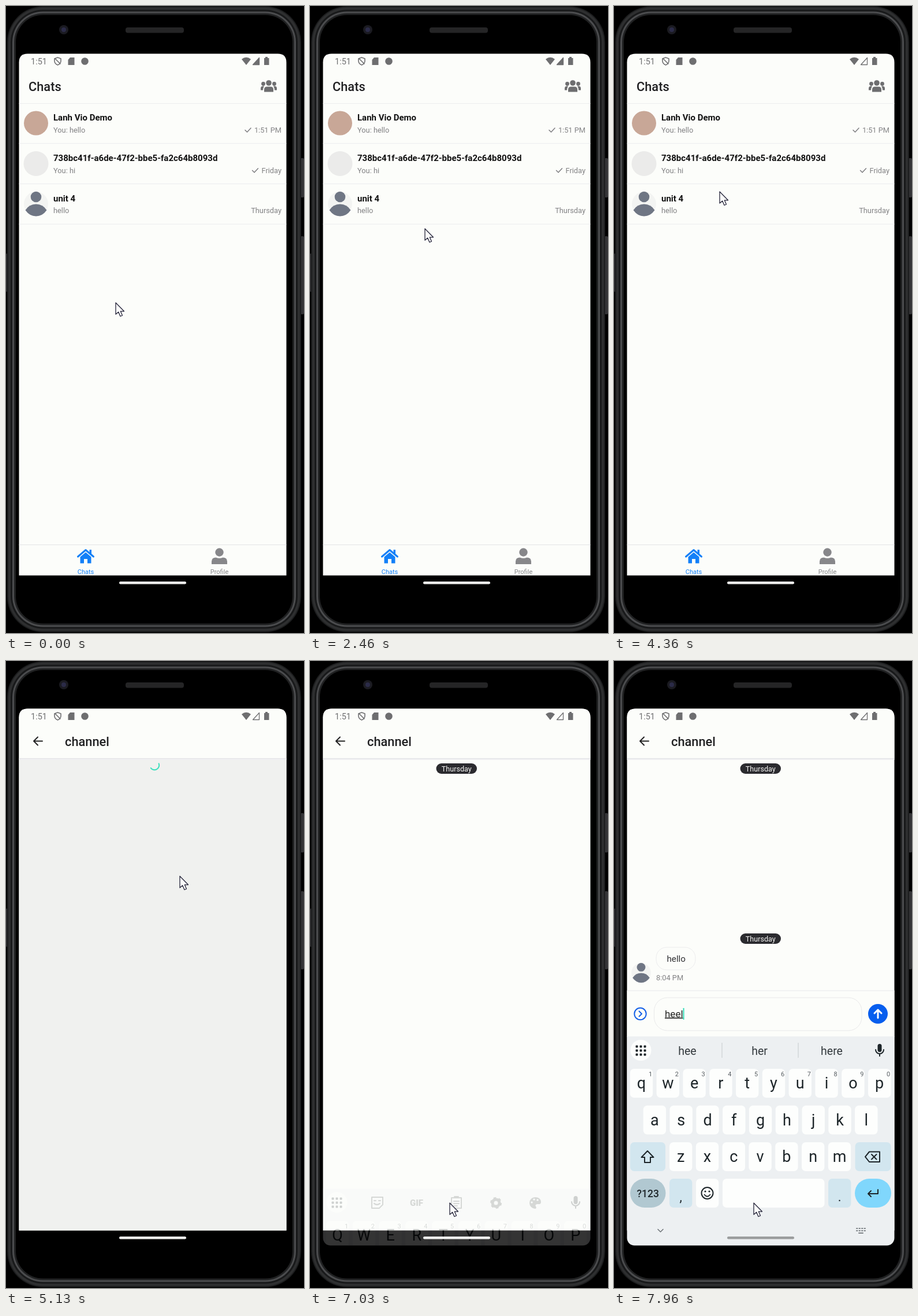
These frames come from a looping animation (516x1084 px, 8000 ms). An HTML page:

```html
<!DOCTYPE html>
<html lang="en">
<head>
<meta charset="utf-8">
<title>Chat app</title>
<style>
  html, body { margin: 0; width: 100%; height: 100%; overflow: hidden; background: #000; }
  svg { display: block; width: 100vw; height: 100vh; font-family: Roboto, Arial, sans-serif; }
  .mid { text-anchor: middle; }
  .end { text-anchor: end; }
  .title { font-size: 21.8px; font-weight: 500; fill: #202022; }
  .name { font-size: 15px; font-weight: 700; fill: #111; }
  .sub { font-size: 12.8px; fill: #828284; }
  .line { fill: none; stroke-linecap: round; stroke-linejoin: round; }
</style>
</head>
<body>
<svg id="stage" viewBox="0 0 516 1084"></svg>
<script>
const LOOP = 8000, PAPER = '#fcfdfa', GREY = '#6e6e70', LIFT = 335;
const OPEN = 4600, LOADED = 5450, RESIZE = 6985, RELAID = 7150, TYPED = [7420, 7560, 7740, 7930];

const rect = (x, y, w, h, fill, rx = 0, more = '') =>
  `<rect x="${x}" y="${y}" width="${w}" height="${h}" rx="${rx}" fill="${fill}" ${more}/>`;
const circle = (x, y, r, fill, more = '') => `<circle cx="${x}" cy="${y}" r="${r}" fill="${fill}" ${more}/>`;
const shape = (d, fill, more = '') => `<path d="${d}" fill="${fill}" ${more}/>`;
const line = (d, color, width = 2, more = '') =>
  `<path class="line" d="${d}" stroke="${color}" stroke-width="${width}" ${more}/>`;
const text = (x, y, s, cls = '', more = '') => `<text x="${x}" y="${y}" class="${cls}" ${more}>${s}</text>`;
const group = (id, inner, more = '') => `<g id="${id}" ${more}>${inner}</g>`;
const at = (x, y, inner, scale = 1) => `<g transform="translate(${x} ${y}) scale(${scale})">${inner}</g>`;

const person = (x, y, k) => at(x, y,
  circle(0, 0, 21, '#f3f4f2') + circle(0, -12, 9.3, '#6f7684') +
  shape('M-18.500 11Q-12 .5 0 .5T18.500 11Q11 21.500 0 21.500T-18.500 11Z', '#6f7684'), k);
const dots = (cx, cy, fill) => [0, 1, 2].flatMap(r => [0, 1, 2].map(c =>
  rect(cx - 9 + c * 7, cy - 9 + r * 7, 4, 4, fill, 1))).join('');
const mic = (x, y, c) => at(x, y, rect(-3.5, -11, 7, 14, c, 3.5) + line('M-7-1a7 7 0 0 0 14 0M0 6V10', c, 2));
const pill = y => rect(218.5, y - 9, 70.5, 18, '#2b2b2f', 9) +
  text(253.8, y + 4.6, 'Thursday', 'mid', 'font-size="12.6" fill="#f6f6f4"');

function phone() {
  // Nested bands from the outer edge inwards make the metal rim.
  const rim = [[2, '#1d1e1f'], [4, '#2e2f30'], [8, '#18191a'], [11, '#4b4c4e'], [14, '#202122'], [17, '#000']];
  return rect(0, 0, 516, 1084, '#000') +
    rect(510, 263, 6, 68, '#343436', 2) + rect(510, 398, 6, 135, '#343436', 2) +
    rect(0, 428, 4, 66, '#2a2a2c', 1) +
    rim.map(([d, c]) => rect(d, d - 1.5, 513 - 2 * d, 1086 - 2 * d, c, 64 - d)).join('') +
    rect(207, 37, 101, 9.5, '#252526', 4) +
    circle(100, 41, 8, '#1b1b21') + circle(100, 41, 4, '#2b2b48');
}

function statusBar() {
  return text(43, 101, '1:51', '', `font-size="14.5" fill="${GREY}"`) +
    line('M89.500 89L95 91V95.500Q94.500 100 89.500 102Q84.500 100 84 95.500V91ZM85.500 91.500L94 100', GREY, 1.6) +
    shape('M111 89H118.500V102H107.500V93Z', GREY) +
    circle(136.500, 95.500, 6.3, GREY) +
    shape('M408 92Q416 85.500 424 92L416 102Z', GREY) +
    line('M427.500 101.500H438.500V89.500Z', GREY, 1.3) +
    shape('M427 102H439V89Z', GREY, 'id="signal"') +
    shape('M447 90H449V88H453V90H455.500V102H447Z', GREY);
}

function row(i, name, message, when, tickX) {
  const y = 168 + i * 69.7;
  return text(82, y + 30.3, name, 'name') + text(82, y + 51, message, 'sub') +
    text(477, y + 51, when, 'sub end') +
    (tickX ? line(`M${tickX} ${y + 46.500}l3.500 3.500 6.500 -7`, '#7e7e81', 1.5) : '') +
    rect(22, y + 69.2, 464, 1, '#ecedee');
}

function home() {
  const crowd = [[-9.500, -4, 3.4], [9.500, -4, 3.4], [0, -5.500, 4.8]];
  return rect(22, 82, 464, 903, PAPER) +
    text(39, 147, 'Chats', 'title') + rect(22, 168, 464, 1, '#ecedee') +
    at(455, 138.500, crowd.map(([x, y, r]) => circle(x, y, r, GREY)).join('') +
      shape('M-8 10V6Q-8 1 -3 1H3Q8 1 8 6V10ZM-14 7V4Q-14 0 -10 0H-8Q-10 3 -10 7ZM14 7V4Q14 0 10 0H8Q10 3 10 7Z', GREY)) +
    row(0, 'Lanh Vio Demo', 'You: hello', '1:51 PM', 414) +
    row(1, '738bc41f-a6de-47f2-bbe5-fa2c64b8093d', 'You: hi', 'Friday', 426.500) +
    row(2, 'unit 4', 'hello', 'Thursday') +
    circle(52, 202.500, 21, '#c8a797') + circle(52, 272.500, 21.500, '#ebebea') + person(52, 342, 1) +
    rect(22, 931, 464, 1, '#e3e4e6') +
    at(138, 951, line('M-13.500 1L0-10.500 13.500 1', '#1380f8', 3) +
      shape('M6.500-11H10V-3L6.500-6ZM-9.500 1.500L0-6.500 9.500 1.500V12.500H3V5H-3V12.500H-9.500Z', '#1380f8')) +
    at(369.500, 951, circle(0, -6.500, 7.2, '#87878a') +
      shape('M-13.500 14V9.500Q-13.500 2.500 -6 2.500Q0 5 6 2.500Q13.500 2.500 13.500 9.500V14Z', '#87878a')) +
    text(138, 982, 'Chats', 'mid', 'font-size="11" fill="#1380f8"') +
    text(369.500, 982, 'Profile', 'mid', 'font-size="11" fill="#858588"');
}

function composer() {
  const arrow = 'M-6 0H6M1-5L6 0 1 5';
  return rect(-24, 905, 546, 80, PAPER) + rect(-24, 904.500, 546, 1, '#e7e7eb') +
    group('idle',
      circle(49.500, 945, 12.8, 'none', `stroke="${GREY}" stroke-width="2.4"`) +
      line('M43 945H56M49.500 938.500V951.500', GREY, 2.4) +
      shape('M92 932L82 948H89L87 959L98 942H91Z', GREY) +
      rect(118, 917, 311, 57, PAPER, 23, 'stroke="#e8e8e9"') +
      text(136, 951, 'Send a message', '', 'font-size="17" fill="#77777a"') +
      circle(457, 945, 17, '#dadbdc') + at(457, 945, line(arrow, '#fff', 2.8))) +
    group('active',
      circle(45.500, 945, 10.2, 'none', 'stroke="#1762e8" stroke-width="2"') +
      line('M43.500 940.500L48 945 43.500 949.500', '#1762e8') +
      rect(69.500, 917, 359.500, 57, PAPER, 23, 'stroke="#e8e8e9"') +
      text(88, 950.500, '', '', 'id="draft" font-size="17" fill="#222" text-decoration="underline"') +
      rect(0, 935, 2, 20, '#35dcb8', 0, 'id="caret"') +
      circle(457, 945, 17, '#075eee') +
      at(457, 945, line('M0 7V-7M-6-1L0-7 6-1', '#fff', 3)));
}

function channel() {
  const wide = (y, h, fill, more) => rect(-24, y, 546, h, fill, 0, more);
  const thread = pill(815) +
    rect(73, 830, 68, 39, PAPER, 18, 'stroke="#ebebec"') +
    text(91.500, 855, 'hello', '', 'font-size="15.2" fill="#303033"') +
    person(47, 874, .8) + text(73, 887, '8:04 PM', 'sub');
  return wide(82, 903, PAPER) + wide(168, 817, '#f0f1ef', 'id="loading"') +
    group('spinner', line('M6.600-4.600A8 8 0 0 1 -4.600 6.600', '#3be0bd', 2)) +
    group('lower', group('thread', thread) + group('composer', composer())) +
    group('sticky', pill(186)) +
    wide(82, 86, PAPER) + wide(168, 1, '#e2e2e6') + wide(169, 2, '#efeff1') +
    line('M60 138.500H45M52 131.500L45 138.500 52 145.500', '#222', 2) +
    text(99, 146.500, 'channel', 'title');
}

const PITCH = 45.8, INK = '#1d2529', BLUE = '#d2e6ef';
function key(cx, y, label, hint = '') {
  return rect(cx - 19.700, y, 39.400, 50, '#fdfefd', 7) +
    text(cx, y + 34, label, 'mid letter', `font-size="27" fill="${INK}"`) +
    text(cx + 15.500, y + 13, hint, 'mid', 'font-size="11" fill="#555b60"');
}

function keyboard() {
  const keys = (letters, x, y, hints = '') =>
    [...letters].map((c, i) => key(x + i * PITCH, y, c, hints[i])).join('');
  const tool = '#45494c';
  const tools = line('M107 664H126V677L120 683H107ZM111 670H114M119 670H122M111 675Q116 679 121 675', tool, 2) +
    text(184.500, 679, 'GIF', 'mid', `font-size="15" font-weight="900" fill="${tool}"`) +
    line('M245 665H262V683H245ZM250 663H257M249 671H258M249 675H258M249 679H255', tool, 2) +
    circle(322, 674, 6, 'none', `stroke="${tool}" stroke-width="5"`) +
    circle(322, 674, 8.500, 'none', `stroke="${tool}" stroke-width="3" stroke-dasharray="4.450"`) +
    shape('M390 664a10 10 0 1 0 0 20q3-1 1-4t2-4h4q3 0 3-4q-1-8-10-8Z', tool) +
    [[384, 673], [388, 668], [394, 669]].map(([x, y]) => circle(x, y, 1.7, '#eef2f4')).join('');
  const words = [['hee', 127], ['her', 252], ['here', 377]].map(([w, x]) =>
    text(x, 681, w, 'mid', `font-size="19.500" fill="#33393d"`)).join('');
  return rect(22, 649, 464, 362, '#edf0f2') +
    circle(46.500, 673, 18, '#fdfefd') + dots(46.500, 673.500, INK) + mic(460, 673, INK) +
    group('tools', tools) +
    group('words', words + rect(186.500, 660, 1, 26, '#c5c9cc') + rect(318.500, 660, 1, 26, '#c5c9cc')) +
    keys('qwertyuiop', 47.500, 705, '1234567890') +
    keys('asdfghjkl', 70.400, 768.500) + keys('zxcvbnm', 115.700, 832) +
    rect(28, 832, 61, 50, BLUE, 7) + line('M58 847L47.500 858H53V867H63V858H68.500Z', INK, 2) +
    rect(417.500, 832, 62, 50, BLUE, 7) +
    line('M442 848.500H460V866H442L435 857.200ZM446 853L454.500 861.500M454.500 853L446 861.500', INK, 2) +
    rect(28, 895, 61.500, 50, '#b1c8d1', 25) +
    text(58.700, 927, '?123', 'mid', `font-size="17.500" font-weight="500" fill="${INK}"`) +
    rect(96, 895, 39.400, 50, BLUE, 7) + text(115.700, 934, ',', 'mid', `font-size="22" fill="${INK}"`) +
    rect(142, 895, 39.400, 50, '#fdfefd', 7) +
    circle(161.500, 920, 10, 'none', `stroke="${INK}" stroke-width="2"`) +
    circle(158, 917, 1.6, INK) + circle(165, 917, 1.6, INK) + line('M156.500 922.500Q161.500 929 166.500 922.500', INK, 1.8) +
    rect(188, 895, 176.500, 50, '#fdfefd', 7) +
    rect(371, 895, 39.400, 50, BLUE, 7) + text(390.700, 934, '.', 'mid', `font-size="22" fill="${INK}"`) +
    rect(417, 895, 63, 50, '#80d7fc', 25) + line('M457 914V921H440M445 916L440 921 445 926', INK, 2) +
    line('M76 982.500L80.500 987 85 982.500', '#71777b', 1.6) +
    [0, 1, 2].map(r => line(`M${r < 2 ? 420 : 424} ${981 + r * 4}H${r < 2 ? 435 : 431}`, '#7f8488', 2,
      r < 2 ? 'stroke-dasharray="1.500 3"' : '')).join('');
}

const stage = document.getElementById('stage');
stage.innerHTML = `<defs>
    <clipPath id="app"><path d="M22.500 984.500V97.500Q22.500 82.500 37.500 82.500H470.500Q485.500 82.500 485.500 97.500V984.500Z"/></clipPath>
    <clipPath id="display">${rect(22.500, 82.5, 463, 928, '#000', 13)}</clipPath>
  </defs>` + phone() +
  `<g clip-path="url(#app)">${group('home', home())}${group('channel', channel())}${statusBar()}</g>` +
  `<g clip-path="url(#display)">${group('keyboard', keyboard())}</g>` +
  rect(196, 995, 116, 4.500, '#f2f2f0', 2.2, 'id="bar"') +
  group('cursor', shape('M0 0V20L4.700 16 8 23.500 11.500 22 8.300 14.800H14.500Z', '#fdfdfc',
    'stroke="#25253a" stroke-width="1.300" stroke-linejoin="round"'));

const el = {};
stage.querySelectorAll('[id]').forEach(node => el[node.id] = node);
const letters = [...stage.querySelectorAll('.letter')].map(node => [node, node.textContent]);

const clamp = v => Math.max(0, Math.min(1, v));
const linear = v => v, smooth = v => v * v * (3 - 2 * v);
function track(t, points, ease = linear) {
  const i = points.findIndex(p => p[0] > t);
  if (i < 0) return points[points.length - 1].slice(1);
  if (i === 0) return points[0].slice(1);
  const [a, b] = [points[i - 1], points[i]], k = ease((t - a[0]) / (b[0] - a[0]));
  return a.slice(1).map((v, n) => v + (b[n + 1] - v) * k);
}
const show = (node, on) => node.setAttribute('display', on ? 'inline' : 'none');
const move = (node, x, y = 0, more = '') => node.setAttribute('transform', `translate(${x} ${y})${more}`);

const POINTER = [[0, 190, 513], [900, 190, 513], [2200, 199, 385], [2900, 199, 385], [4100, 183, 321],
  [4650, 183, 321], [5130, 301, 372], [5760, 399, 731], [6550, 242, 937]];
const SLIDE = [[OPEN, 46], [4750, 20], [4930, 7], [5130, 3], [5760, 1], [6000, 0]];
const RISE = [[RESIZE, 345, 0], [7030, 265, .2], [7110, 95, .65], [7240, 0, 1]];

function update(t) {
  const [slide] = track(t, SLIDE), [drop, alpha] = track(t, RISE);
  const fade = clamp((t - OPEN) / 120), loaded = t >= LOADED, lifted = t >= RESIZE;
  const count = TYPED.filter(at => t >= at).length;

  show(el.home, fade < 1);
  show(el.channel, fade > 0);
  el.channel.setAttribute('opacity', fade);
  move(el.channel, slide);
  show(el.signal, t < 3400);

  show(el.loading, !loaded);
  show(el.spinner, !loaded);
  move(el.spinner, 254, 180, ` rotate(${(t - 5130) * .4 + 15})`);
  show(el.lower, loaded && (!lifted || t >= RELAID));
  move(el.lower, 0, lifted ? -LIFT : 0);
  show(el.sticky, lifted);

  show(el.idle, count === 0);
  show(el.active, count > 0);
  el.draft.textContent = 'heel'.slice(0, count);
  if (count) el.caret.setAttribute('x', 88 + el.draft.getComputedTextLength());

  show(el.keyboard, lifted);
  el.keyboard.setAttribute('opacity', alpha);
  move(el.keyboard, 0, drop);
  show(el.tools, count === 0);
  show(el.words, count > 0);
  for (const [node, c] of letters) node.textContent = count ? c : c.toUpperCase();
  el.bar.setAttribute('fill', alpha > .5 ? '#9b9d9e' : '#f2f2f0');

  move(el.cursor, ...track(t, POINTER, smooth));
}

const start = performance.now();
function tick() {
  update((performance.now() - start) % LOOP);
  requestAnimationFrame(tick);
}
tick();
</script>
</body>
</html>
```
